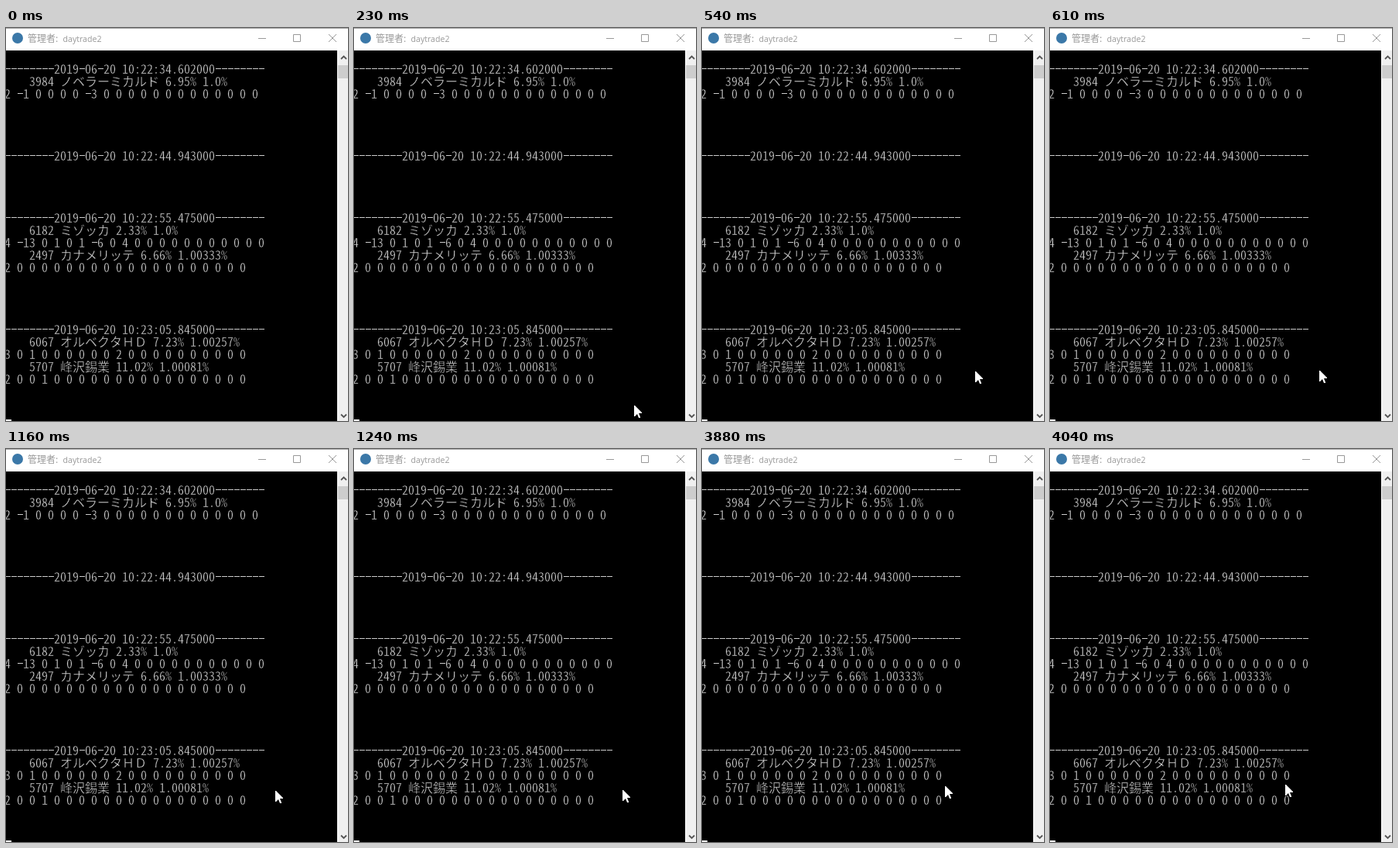
Animation of 442 by 507 pixels, one loop 8 s. Source, as an HTML page with a canvas:

```html
<!DOCTYPE html>
<html lang="ja">
<head>
<meta charset="utf-8">
<style>
  html, body { margin: 0; width: 100%; height: 100%; overflow: hidden; background: #000; }
  canvas { display: block; }
</style>
</head>
<body>
<canvas id="stage" width="442" height="507"></canvas>
<script>
const ctx = document.getElementById('stage').getContext('2d');
const LOOP = 8000;
const CELL = 8, ROW = 16, LEFT = -2, TOP = 45, GAP = 4;
const COUNTS = 20;

// Each report: time stamp, then pairs of a stock line and its leading counts.
const reports = [
  ['10:22:34.602000', ['3984 ノベラーミカルド 6.95% 1.0%', '2 -1 0 0 0 0 -3']],
  ['10:22:44.943000'],
  ['10:22:55.475000', ['6182 ミゾッカ 2.33% 1.0%', '4 -13 0 1 0 1 -6 0 4'],
                      ['2497 カナメリッテ 6.66% 1.00333%', '2']],
  ['10:23:05.845000', ['6067 オルベクタＨＤ 7.23% 1.00257%', '3 0 1 0 0 0 0 0 0 2'],
                      ['5707 峰沢錫業 11.02% 1.00081%', '2 0 0 1']]
];

const dashes = '-'.repeat(8);
const fillZeros = head => head + ' 0'.repeat(COUNTS - head.split(' ').length);
const lines = reports.flatMap(([stamp, ...stocks]) => [
  dashes + '2019-06-20 ' + stamp + dashes,
  ...stocks.flatMap(([stock, head]) => ['    ' + stock, fillZeros(head)]),
  ...Array(GAP).fill('')
]);

// Pointer drags, sampled in a few even ticks; a higher ease slows the end more.
const moves = [
  { start: 230, end: 610, ticks: 5, from: [362, 487], to: [348, 442], ease: [0.7, 2.3] },
  { start: 1160, end: 1240, ticks: 1, from: [348, 441], to: [347, 440], ease: [1, 1] },
  { start: 3730, end: 4040, ticks: 4, from: [344, 439], to: [304, 433], ease: [2, 2] }
];

function pointerAt(time) {
  const now = Math.floor(time / 10) * 10;
  const move = moves.filter(m => m.start <= now).pop();
  if (!move) return null;
  const tick = (move.end - move.start) / move.ticks;
  const progress = Math.min(1, Math.floor((now - move.start + 8) / tick) / move.ticks);
  return move.from.map((a, i) =>
    Math.round(a + (move.to[i] - a) * (1 - (1 - progress) ** move.ease[i])));
}

function rect(color, x, y, w, h) {
  ctx.fillStyle = color;
  ctx.fillRect(x, y, w, h);
}

function polyline(points, color, width) {
  ctx.beginPath();
  points.forEach(([x, y]) => ctx.lineTo(x, y));
  ctx.strokeStyle = color;
  ctx.lineWidth = width;
  ctx.stroke();
}

function drawLine(text, row) {
  const top = TOP + row * ROW;
  let x = LEFT;
  for (const char of text) {
    const width = char.charCodeAt(0) > 255 ? CELL * 2 : CELL;
    if (char === '-') {
      ctx.fillRect(x + 1, top + 7, 7, 1);
    } else {
      ctx.fillText(char, x + width / 2, top + 14);
      ctx.strokeText(char, x + width / 2, top + 14);
    }
    x += width;
  }
}

function drawConsole() {
  rect('#000', 0, 29, 428, 478);
  ctx.fillStyle = '#ccc';
  // A fine black outline thins the strokes of the font.
  ctx.strokeStyle = '#000';
  ctx.lineWidth = 0.3;
  ctx.lineJoin = 'round';
  ctx.font = '300 16px "Noto Sans Mono CJK JP", "Noto Sans CJK JP", "Noto Sans CJK", monospace';
  ctx.textAlign = 'center';
  lines.forEach(drawLine);
  rect('#fff', 0, 505, 7, 2);
}

function drawTitleBar() {
  rect('#fff', 0, 0, 442, 29);
  rect('#aaa', 0, 0, 442, 1);
  ctx.fillStyle = '#3b78a8';
  ctx.beginPath();
  ctx.arc(15, 13, 7, 0, Math.PI * 2);
  ctx.fill();

  ctx.fillStyle = '#999';
  ctx.textAlign = 'left';
  ctx.font = '12px "Noto Sans CJK JP", "Noto Sans CJK", sans-serif';
  ctx.fillText('管理者:', 28, 18);
  ctx.font = '10.6px "Open Sans", sans-serif';
  ctx.fillText('daytrade2', 73.5, 18);

  rect('#999', 326, 13, 10, 1);
  ctx.strokeStyle = '#999';
  ctx.lineWidth = 1;
  ctx.strokeRect(371.5, 8.5, 9, 9);
  polyline([[417, 8], [427, 18]], '#999', 1);
  polyline([[427, 8], [417, 18]], '#999', 1);
}

function chevron(tipY, direction) {
  const baseY = tipY + 3.5 * direction;
  polyline([[433, baseY], [436.5, tipY], [440, baseY]], '#555', 1.8);
}

function drawScrollbar() {
  rect('#fff', 428, 29, 1, 478);
  rect('#f0f0f0', 429, 29, 13, 478);
  rect('#cdcdcd', 429, 48, 13, 17);
  ctx.lineJoin = 'miter';
  chevron(36.5, 1);
  chevron(502, -1);
}

function drawPointer(time) {
  const tip = pointerAt(time);
  if (!tip) return;
  const shape = [[0, 0], [1, 0], [10, 9], [10, 10], [6, 10], [8, 15], [8, 16], [6, 16], [4, 11], [1, 14], [0, 14]];
  ctx.beginPath();
  shape.forEach(([x, y]) => ctx.lineTo(tip[0] + x, tip[1] + y));
  ctx.closePath();
  ctx.strokeStyle = '#000';
  ctx.lineWidth = 2;
  ctx.stroke();
  ctx.fillStyle = '#fff';
  ctx.fill();
}

const begin = performance.now();
function frame() {
  drawConsole();
  drawTitleBar();
  drawScrollbar();
  drawPointer((performance.now() - begin) % LOOP);
  requestAnimationFrame(frame);
}
frame();
</script>
</body>
</html>
```
